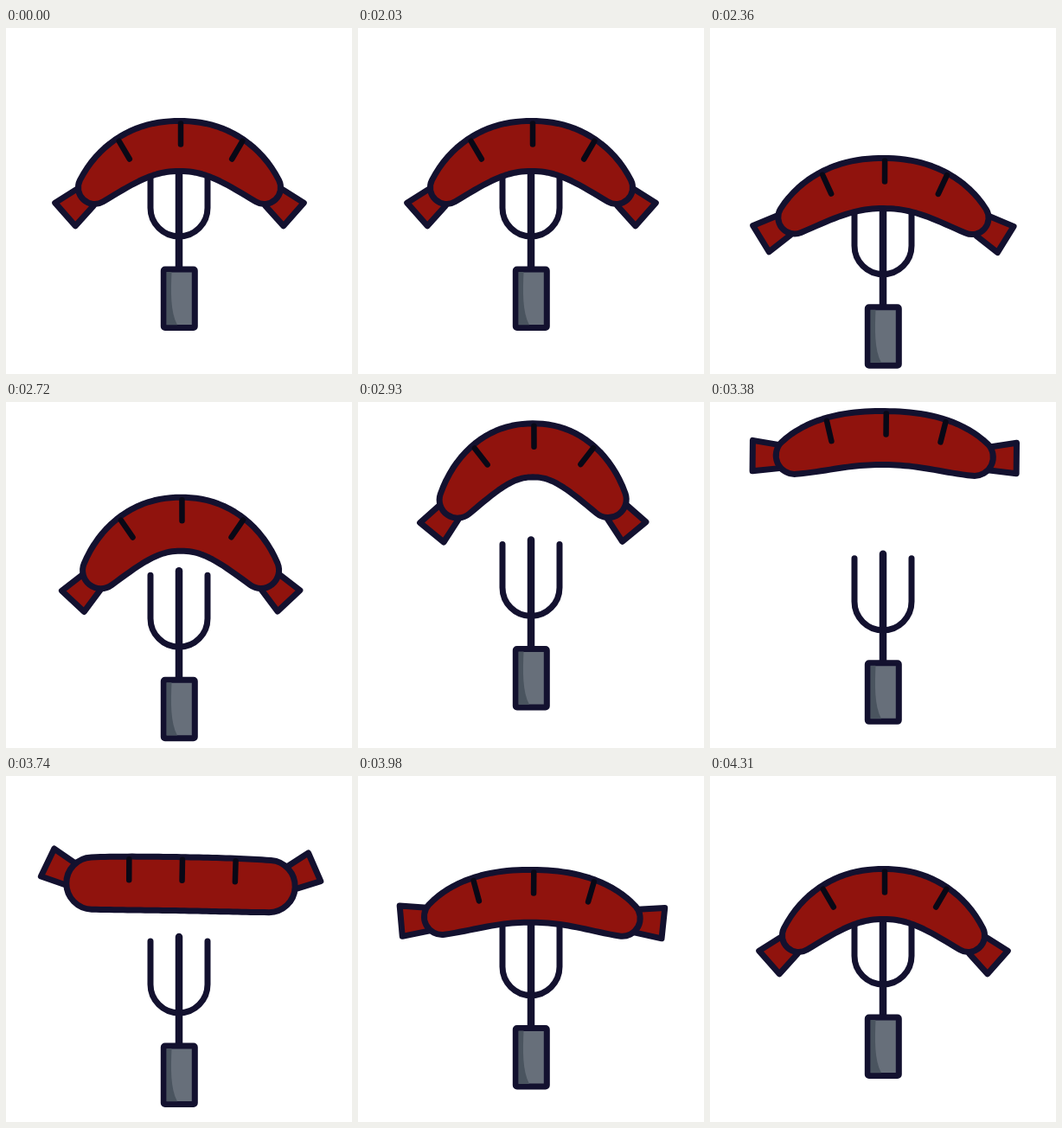
An HTML page that plays this animation: 400x400 px, repeating every 4.34 s.

```html
<!DOCTYPE html>
<html lang="en">
<head>
<meta charset="utf-8">
<title>Sausage toss</title>
<style>
  html, body { margin: 0; height: 100%; overflow: hidden; background: #fff; }
  svg { display: block; width: 100%; height: 100%; }
  path, rect { stroke: #13112f; stroke-width: 7; stroke-linecap: round; stroke-linejoin: round; fill: none; }
  .red { fill: #90130d; }
  #prong { stroke-width: 8.5; }
  #marks { stroke: #080816; stroke-width: 6.5; }
</style>
</head>
<body>
<svg viewBox="0 0 400 400">
  <g id="fork">
    <path d="M167 158V208A33 33 0 0 0 233 208V158"/>
    <path id="prong" d="M200 153V279"/>
    <rect x="182.3" y="279" width="36" height="67.5" rx="1.5" style="fill:#676f7a"/>
    <path d="M185.5 282H191.5C190.5 305 190 328 198 343.3H185.5Z" style="fill:#4a545f;stroke:none"/>
  </g>
  <g id="sausage">
    <path id="knots" class="red"/>
    <path id="body" class="red"/>
    <path id="marks" transform="translate(1.5)"/>
  </g>
</svg>
<script>
const LOOP = 4340, BOW = 2.2;
const { abs, sign, sin, cos, atan, asin, tanh, min, max, PI } = Math;
const [fork, sausage, knots, body, marks] =
  ["fork", "sausage", "knots", "body", "marks"].map(id => document.getElementById(id));

// Smooth curve through [time, value] keys that never overshoots them.
function track(...keys) {
  const secant = i => keys[i] && keys[i + 1]
    ? (keys[i + 1][1] - keys[i][1]) / (keys[i + 1][0] - keys[i][0]) : 0;
  const slope = i => {
    const a = secant(i - 1), b = secant(i);
    return a * b > 0 ? 2 * a * b / (a + b) : 0;
  };
  return t => {
    if (t <= keys[0][0]) return keys[0][1];
    const i = keys.findIndex(k => k[0] > t) - 1;
    if (i < 0) return keys[keys.length - 1][1];
    const [t0, v0] = keys[i], [t1, v1] = keys[i + 1], span = t1 - t0;
    const p = (t - t0) / span, q = 1 - p;
    return v0 * q * q * (1 + 2 * p) + v1 * p * p * (3 - 2 * p)
      + span * p * q * (slope(i) * q - slope(i + 1) * p);
  };
}

const forkDrop = track([2030, 0], [2540, 61], [3030, 0], [3630, 36.5], [4210, 0]);
const sausageTop = track([2030, 107.5], [2540, 167.5], [2930, 25], [3160, 5], [3380, 10.5],
  [3620, 42], [3740, 93.5], [3870, 111], [4130, 104.5], [4310, 107.5]);
const sausageDroop = track([2030, 48], [2285, 38], [2540, 48], [2945, 57], [3690, 0], [4260, 48]);

// A tapering tube around a bowed spine; s runs from -1 (left end) to 1 (right end),
// droop is how far the ends hang below the middle.
function drawSausage(top, droop, grip) {
  const reach = 102 + 0.1 * droop - 20.7 * (droop / 57) ** 5;
  const girth = 31 - 2 * grip, taper = 10 * tanh(droop / 12);
  const radius = s => girth - taper * s ** 4;
  const tilt = s => sign(s) * atan(BOW * droop * abs(s) ** (BOW - 1) / reach);
  const offset = (s, angle, r) =>
    [s * reach + r * cos(angle), girth + droop * abs(s) ** BOW + r * sin(angle)];

  // Points where the tube touches its outline, on the back (1) or the belly (-1).
  const edge = side => Array.from({ length: 41 }, (_, i) => {
    const s = i / 20 - 1, angle = tilt(s);
    const lean = asin(4 * taper * s ** 3 * cos(angle) / reach);
    return offset(s, angle - side * (PI / 2 - lean), radius(s));
  });
  const cap = `A${radius(1)} ${radius(1)} 0 0 1 `;
  const back = edge(1), belly = edge(-1).reverse();
  body.setAttribute("d", `M${back.join("L")}${cap}${belly.join("L")}${cap}${back[0]}Z`);

  // The knots flick outward as the sausage straightens.
  const flick = 4 + 22 / (1 + (droop / 32) ** 6);
  const turn = tilt(1) - flick * PI / 180;
  const near = radius(1) - 4, far = radius(1) + 27;
  const corners = [[near, -12], [far, -17], [far, 18.5], [near, 15]];
  const knot = side => "M" + corners.map(([u, v]) => [
    side * (reach + u * cos(turn) - v * sin(turn)),
    girth + droop + u * sin(turn) + v * cos(turn)
  ]).join("L") + "Z";
  knots.setAttribute("d", knot(-1) + knot(1));

  marks.setAttribute("d", [-0.6, 0, 0.6].map(s =>
    "M" + [3, 27].map(depth => offset(s, tilt(s) - PI / 2, radius(s) - depth)).join("L")).join(""));

  const roll = 1 - droop / 48;
  sausage.setAttribute("transform", `translate(${202 - 1.5 * grip} ${top}) rotate(${roll} 0 ${girth})`);
}

function frame() {
  const t = performance.now() % LOOP;
  const drop = forkDrop(t), top = sausageTop(t);
  // The sausage is squeezed while it sits on the prongs.
  const grip = min(1, max(0, (top - drop - 91) / 16));
  fork.setAttribute("transform", `translate(0 ${drop})`);
  drawSausage(top, sausageDroop(t), grip);
  requestAnimationFrame(frame);
}
frame();
</script>
</body>
</html>
```
